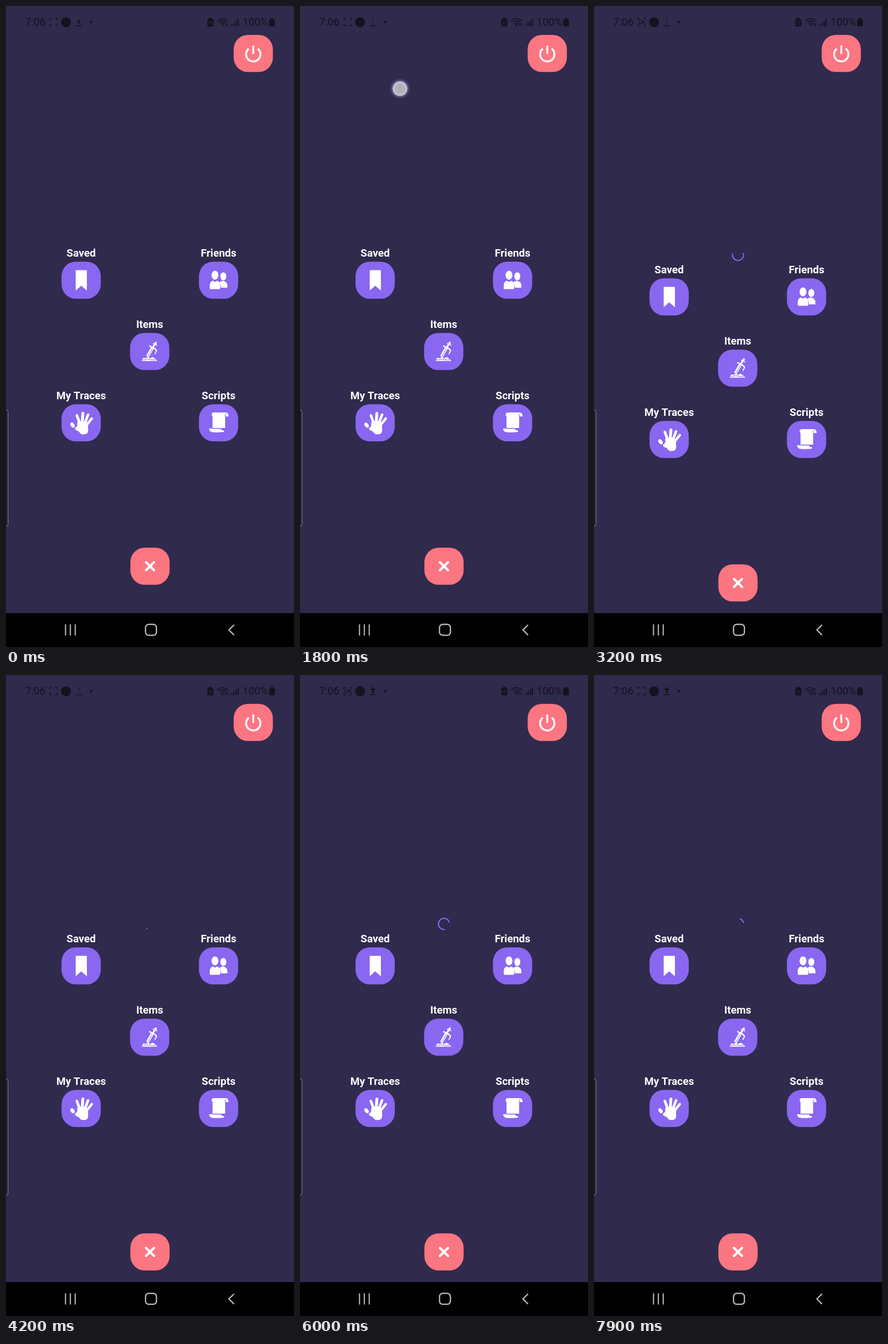
These frames come from a looping animation (502x1115 px, 8000 ms). An HTML page with a canvas:

```html
<!DOCTYPE html>
<html lang="en">
<head>
<meta charset="utf-8">
<title>Menu</title>
<style>
  html, body { margin: 0; width: 100%; height: 100%; overflow: hidden; background: #302a4d; }
  canvas { display: block; width: 502px; height: 1115px; }
</style>
</head>
<body>
<canvas id="stage" width="502" height="1115"></canvas>
<script>
const ctx = document.getElementById('stage').getContext('2d');
const LOOP = 8000, STEP = 100;
const BG = '#302a4d', PURPLE = '#8967f0', CORAL = '#fb7681', INK = '#15121f';
const PRESS = 1700, RELEASE = 2900, SPIN_START = 2876, SHIFT = 29;
const TAU = Math.PI * 2;

const clamp = v => Math.max(0, Math.min(1, v));
const smooth = v => { v = clamp(v); return v * v * (3 - 2 * v); };

function box(x, y, w, h, r, fill) {
  ctx.beginPath();
  ctx.roundRect(x, y, w, h, r);
  ctx.fillStyle = fill;
  ctx.fill();
}

function oval(x, y, rx, ry = rx, fill = '#fff', turn = 0) {
  ctx.beginPath();
  ctx.ellipse(x, y, rx, ry, turn, 0, TAU);
  ctx.fillStyle = fill;
  ctx.fill();
}

function line(points, width, color = '#fff', cap = 'round') {
  ctx.beginPath();
  points.forEach(([x, y]) => ctx.lineTo(x, y));
  ctx.lineWidth = width;
  ctx.lineCap = cap;
  ctx.lineJoin = 'round';
  ctx.strokeStyle = color;
  ctx.stroke();
}

function fillPath(d, color = '#fff') {
  ctx.fillStyle = color;
  ctx.fill(new Path2D(d));
}

function text(str, x, y, font, color, align = 'left') {
  ctx.font = font + ' Roboto, sans-serif';
  ctx.textAlign = align;
  ctx.fillStyle = color;
  ctx.fillText(str, x, y);
}

// Icons are drawn around the centre of their button.
function bookmark() {
  fillPath('M-8.5-17.5H9Q10-17.5 10-16.5V18L0 9.5L-9.5 18V-16.5Q-9.5-17.5-8.5-17.5Z');
}

function friends() {
  oval(8.3, -6.8, 5.2, 7);
  fillPath('M1 13V5Q3 1 8 1Q16 2 15.5 13Z');
  oval(-6.2, -8.5, 7, 8.7, PURPLE);
  oval(-6.2, -8.7, 6, 7.7);
  fillPath('M-17 16.5Q-18 0-6.5 0Q5 0 4 16.5Z', PURPLE);
  fillPath('M-15 15.5Q-17 2-9.5 1L-6 3L-2.5 1Q4 2 3 13.5Q3 15.5 1 15.5Z');
}

function sword() {
  fillPath('M-14 16.5L-11.5 11L-6 11.5L-3 9L0 12L5 9.5L9 12L13.5 16.5Z');
  line([[-12, 14.5], [-3, 13.2], [5, 14.6], [10, 14]], 1, PURPLE);
  line([[5, -7], [-4, 9]], 5.2, '#fff', 'butt');
  line([[4.5, -5], [-3, 8.5]], 1, PURPLE, 'butt');
  line([[0, -9.5], [4, -7.5], [9, -5], [11.5, -2]], 2.4);
  line([[6, -8], [10, -14.5]], 3);
  line([[6, -14], [12.5, -11]], 1.5);
  oval(10.5, -15, 2);
  line([[12, -1], [9, 4]], 1.6);
}

function hand() {
  line([[-7.5, -13], [-3.5, -2]], 4.6);
  line([[3, -16.5], [2, -3]], 5);
  line([[12, -14], [7.5, -2]], 4.6);
  line([[18.5, -7.5], [11, 2]], 4.4);
  oval(-15, 4, 3.3, 4.8, '#fff', -0.6);
  fillPath('M-7-1Q2-5 11-1Q13 3 12 8Q13 13 11 18Q5 22-1 19Q-4 14-9 13Q-13 9-8 7Q-6 4-7-1Z');
}

function scroll() {
  fillPath('M-12-14Q-12-18-8-18H13Q17.5-17.5 17.5-11H11.5V9H-10.5V-11Q-12-12-12-14Z');
  line([[11.5, -11], [11.5, -14], [13, -16]], 1, PURPLE);
  fillPath('M-16.5 10H4Q5 13.5 9.5 13.5V15.5Q8 17-10 16.5Q-16 16-16.5 10Z');
  line([[-10, 10], [4, 10]], 1, PURPLE, 'butt');
}

function cross() {
  line([[-7, -7], [7, 7]], 4);
  line([[7, -7], [-7, 7]], 4);
}

function power() {
  ctx.beginPath();
  ctx.arc(0, 1.5, 12.5, -Math.PI / 2 + 0.66, Math.PI * 1.5 - 0.66);
  ctx.lineWidth = 3.4;
  ctx.lineCap = 'butt';
  ctx.strokeStyle = '#fff4f5';
  ctx.stroke();
  line([[0, -14], [0, 1]], 3.4, '#fff4f5', 'butt');
}

function button(x, y, color, icon, label) {
  box(x - 34.2, y - 32.3, 68.4, 64.6, 25, color);
  ctx.save();
  ctx.translate(x, y);
  icon();
  ctx.restore();
  if (label) text(label, x, y - 41, 'bold 18.5px', '#fff', 'center');
}

function recordIcon(t) {
  for (const sx of [-1, 1]) for (const sy of [-1, 1]) {
    line([[83 + sx * 6.5, 28 + sy * 3], [83 + sx * 6.5, 28 + sy * 6.3], [83 + sx * 3, 28 + sy * 6.3]], 1.3, INK, 'butt');
  }
  const blink = t % 1300;
  if (blink >= 550 && blink < 1200) {
    ctx.strokeStyle = INK;
    ctx.lineWidth = 1.2;
    ctx.strokeRect(79, 25.5, 5.5, 5);
    fillPath('M85 28L88 25.5V30.5Z', INK);
  }
}

function uploadIcon(t) {
  const phase = t % 650;
  line([[121.5, 34.3], [132.5, 34.3]], 1.5, INK, 'butt');
  if (phase < 100) {
    line([[127, 23.5], [127, 31]], 3, INK, 'butt');
  } else if (phase < 200) {
    fillPath('M127 20.5L132 26H128.5V32H125.5V26H122Z', INK);
  } else {
    line([[124, 24], [130, 24]], 1, '#221d35', 'butt');
    line([[127, 24], [127, 31]], 1.3, '#221d35', 'butt');
  }
}

function statusBar(t) {
  text('7:06', 33.5, 34.3, '18.3px', INK);
  recordIcon(t);
  oval(104.7, 28.2, 8.6, 8.6, INK);
  uploadIcon(t);
  oval(148.3, 28.3, 2, 2, INK);

  box(351, 22.5, 10.5, 13, 2, INK);
  box(353.5, 20.8, 5.5, 3, 0.5, INK);
  ctx.beginPath();
  ctx.arc(356.2, 29, 2.5, 0, TAU);
  ctx.lineWidth = 1;
  ctx.strokeStyle = BG;
  ctx.stroke();

  for (const r of [4, 8, 12]) {
    ctx.beginPath();
    ctx.arc(377.5, 34, r, -Math.PI * 0.77, -Math.PI * 0.23);
    ctx.lineWidth = 1.7;
    ctx.lineCap = 'butt';
    ctx.strokeStyle = INK;
    ctx.stroke();
  }
  oval(377.5, 33.3, 1.5, 1.5, INK);
  line([[383, 30], [383, 35]], 1.4, INK, 'butt');
  line([[386, 30], [386, 35]], 1.4, INK, 'butt');
  for (let i = 0; i < 4; i++) {
    const h = 3.5 + i * 3;
    box(393 + i * 3.6, 35 - h, 2, h, 0.4, INK);
  }
  text('100%', 412.5, 34.3, '18.3px', INK);
  box(458.7, 23, 10, 12.5, 1.8, INK);
  box(461.2, 21, 5, 3, 0.5, INK);
}

function edgePanel() {
  ctx.beginPath();
  ctx.roundRect(-12, 702.5, 15.7, 202.5, 4);
  ctx.fillStyle = '#231f36';
  ctx.fill();
  ctx.lineWidth = 1;
  ctx.strokeStyle = '#85828f';
  ctx.stroke();
}

function navBar() {
  ctx.fillStyle = '#000';
  ctx.fillRect(0, 1056, 502, 59);
  const gray = '#bdbdbd';
  for (const x of [103.7, 112.2, 120.7]) line([[x, 1075.5], [x, 1095]], 2, gray, 'butt');
  ctx.beginPath();
  ctx.roundRect(243.2, 1075.7, 19, 19, 5.5);
  ctx.lineWidth = 2.2;
  ctx.strokeStyle = gray;
  ctx.stroke();
  line([[397.5, 1076.5], [388.5, 1085.3], [397.5, 1094.2]], 2.2, gray, 'butt');
}

// y of a cubic Bézier at a given x, found by bisection
function curveAt(x, [x0, x1, x2, x3], [y0, y1, y2, y3]) {
  const bez = (a, b, c, d, s) => {
    const q = 1 - s;
    return a * q * q * q + 3 * b * q * q * s + 3 * c * q * s * s + d * s * s * s;
  };
  let lo = 0, hi = 1;
  for (let i = 0; i < 24; i++) {
    const mid = (lo + hi) / 2;
    if (bez(x0, x1, x2, x3, mid) < x) lo = mid; else hi = mid;
  }
  return bez(y0, y1, y2, y3, lo);
}

function spinner(age) {
  const p = (age / 1333) % 1;
  const tail = p < 0.5 ? 0 : curveAt(p, [0.5, 0.7, 0.6, 1], [0, 0, 1, 1]);
  const head = p > 0.5 ? 1 : curveAt(p, [0, 0.2, 0.1, 0.5], [0, 0, 1, 1]);
  const base = age / 2222 + p / 4 - 0.25;
  ctx.beginPath();
  ctx.arc(251, 433, 9.7, (base + tail * 0.75) * TAU, (base + head * 0.75 + 0.001) * TAU);
  ctx.lineWidth = 2;
  ctx.lineCap = 'square';
  ctx.strokeStyle = PURPLE;
  ctx.stroke();
}

function touch(t) {
  const k = (t - 1800) / 1000;
  const x = 174.3 - 37 * k, y = 143.7 + 10 * k;
  const glow = ctx.createRadialGradient(x, y, 11, x, y, 18);
  glow.addColorStop(0, 'rgba(150,142,190,0.75)');
  glow.addColorStop(0.5, 'rgba(120,112,165,0.5)');
  glow.addColorStop(1, 'rgba(100,92,150,0)');
  oval(x, y, 18, 18, glow);
  const core = ctx.createRadialGradient(x, y, 0, x, y, 12.8);
  core.addColorStop(0, '#aeabb6');
  core.addColorStop(0.7, '#b9b6c1');
  core.addColorStop(1, '#cbc8d3');
  oval(x, y, 12.8, 12.8, core);
}

function powerAlpha(t) {
  if (t < RELEASE) return 1 - 0.8 * smooth((t - 1800) / 200);
  return 0.2 + 0.8 * smooth((t - RELEASE) / 250);
}

function draw(t) {
  const loading = t >= RELEASE;
  ctx.fillStyle = BG;
  ctx.fillRect(0, 0, 502, 1115);
  statusBar(t);
  edgePanel();

  ctx.globalAlpha = powerAlpha(t);
  button(431, 82.5, CORAL, power);
  ctx.globalAlpha = 1;

  ctx.save();
  ctx.translate(0, loading ? SHIFT : 0);
  button(131, 477, PURPLE, bookmark, 'Saved');
  button(370.5, 477, PURPLE, friends, 'Friends');
  button(250.5, 601, PURPLE, sword, 'Items');
  button(131, 725, PURPLE, hand, 'My Traces');
  button(370.5, 725, PURPLE, scroll, 'Scripts');
  button(251, 974.5, CORAL, cross);
  ctx.restore();

  if (loading) spinner(t - SPIN_START);
  navBar();
  if (t >= PRESS && t < RELEASE) touch(t);
}

const begin = performance.now();
function tick() {
  const t = (performance.now() - begin) % LOOP;
  draw(Math.floor(t / STEP) * STEP);
  requestAnimationFrame(tick);
}
tick();
</script>
</body>
</html>
```
